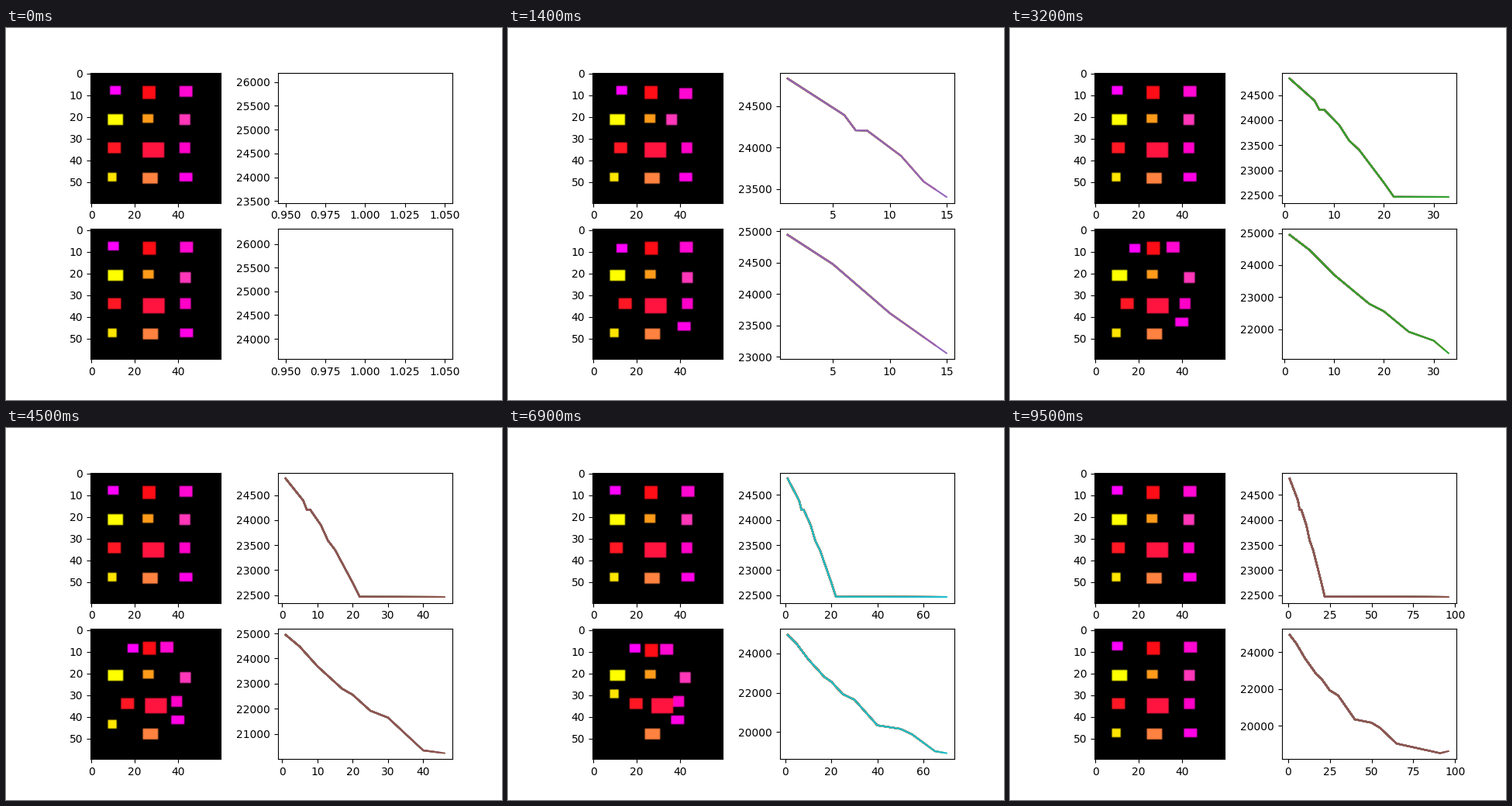
These frames come from a looping animation (640 px wide and 480 px high, 9600 ms). A matplotlib script:

```python
import numpy as np
import matplotlib.pyplot as plt
from matplotlib.animation import FuncAnimation
from matplotlib.colors import to_rgb

STEPS = 96
SIZE = 60

# Width, height and colour of each block, row by row on a loose 3 x 4 grid
BLOCKS = {
    "A": (5, 4, "#ff00ff"), "B": (6, 6, "#ff0d16"), "C": (6, 5, "#ff08d2"),
    "D": (7, 5, "#ffff00"), "E": (5, 4, "#ff9b1a"), "F": (5, 5, "#ff37b9"),
    "G": (6, 5, "#ff1824"), "H": (10, 7, "#ff1440"), "I": (5, 5, "#ff00c8"),
    "J": (4, 4, "#ffe600"), "K": (7, 5, "#ff8240"), "L": (6, 4, "#ff00e6"),
}
DIRECTIONS = {"l": (-1, 0), "r": (1, 0), "u": (0, -1), "d": (0, 1)}

# Runs of unit moves, one per step: block, direction, count
TOP_MOVES = "Ar1 Fl5 Gr1 Cd1 Fl2 Ar2 Gr1 Ll1 Cl1 Gr2 Ar2 Ll2 Fl1"
BOTTOM_MOVES = (
    "Fd1 Gr4 Ll2 Ad1 Lu3 Cl1 Ar3 Cl2 Il2 Cl5 Ar5 Ll2 Lu2 "
    "Gr2 Il2 Hr1 Cl1 Lu1 Ju4 Ar1 Iu1 Ju9 Gr1 Bd1 Cd1 Ll1 "
    "Gr2 Hr2 Cl1 Fl1 Ju26"
)

# Turning points of the cost curves: step, cost
TOP_COST = [
    (1, 24829), (6, 24390), (7, 24207), (8, 24205), (11, 23900),
    (13, 23590), (15, 23407), (20, 22750), (22, 22468), (STEPS, 22464),
]
BOTTOM_COST = [
    (1, 24945), (5, 24475), (10, 23695), (17, 22800), (20, 22560),
    (25, 21925), (30, 21650), (40, 20345), (50, 20164), (55, 19890),
    (65, 19030), (91, 18510), (STEPS, 18620),
]


def grid_corner(index):
    row, column = divmod(index, 3)
    return 8 + int(16.5 * column), 6 + 40 * row // 3


def draw_blocks(corners):
    image = np.zeros((SIZE, SIZE, 3))
    for name, (x, y) in corners.items():
        width, height, color = BLOCKS[name]
        image[y:y + height, x:x + width] = to_rgb(color)
    return image


def build_images(moves):
    """One image per step; the starting layout returns once moves run out."""
    start = {name: grid_corner(i) for i, name in enumerate(BLOCKS)}
    corners = dict(start)
    images = []
    for run in moves.split():
        name, (dx, dy) = run[0], DIRECTIONS[run[1]]
        for _ in range(int(run[2:])):
            x, y = corners[name]
            corners[name] = (x + dx, y + dy)
            images.append(draw_blocks(corners))
    return images + [draw_blocks(start)] * (STEPS - len(images))


def limits(values):
    low, high = values.min(), values.max()
    if low == high:
        low, high = low * 0.95, high * 1.05
    margin = 0.05 * (high - low)
    return low - margin, high + margin


class Row:
    def __init__(self, axes, moves, turns):
        picture_ax, self.cost_ax = axes
        self.images = build_images(moves)
        self.cost = np.interp(steps, *zip(*turns))
        self.picture = picture_ax.imshow(self.images[0])
        # Each step adds a line over the earlier ones, in the next cycle colour
        self.lines = [
            self.cost_ax.plot(steps[:n], self.cost[:n], color=f"C{(n - 1) % 10}")[0]
            for n in steps
        ]

    def show(self, i):
        self.picture.set_data(self.images[i])
        for k, line in enumerate(self.lines):
            line.set_visible(k <= i)
        self.cost_ax.set_xlim(limits(steps[:i + 1]))
        self.cost_ax.set_ylim(limits(self.cost[:i + 1]))


steps = np.arange(1, STEPS + 1)
fig, axs = plt.subplots(2, 2, figsize=(6.4, 4.8), dpi=100)
rows = [
    Row(axs[0], TOP_MOVES, TOP_COST),
    Row(axs[1], BOTTOM_MOVES, BOTTOM_COST),
]


def update(i):
    for row in rows:
        row.show(i)


anim = FuncAnimation(fig, update, frames=STEPS, interval=100, repeat=True)
plt.show()
```
